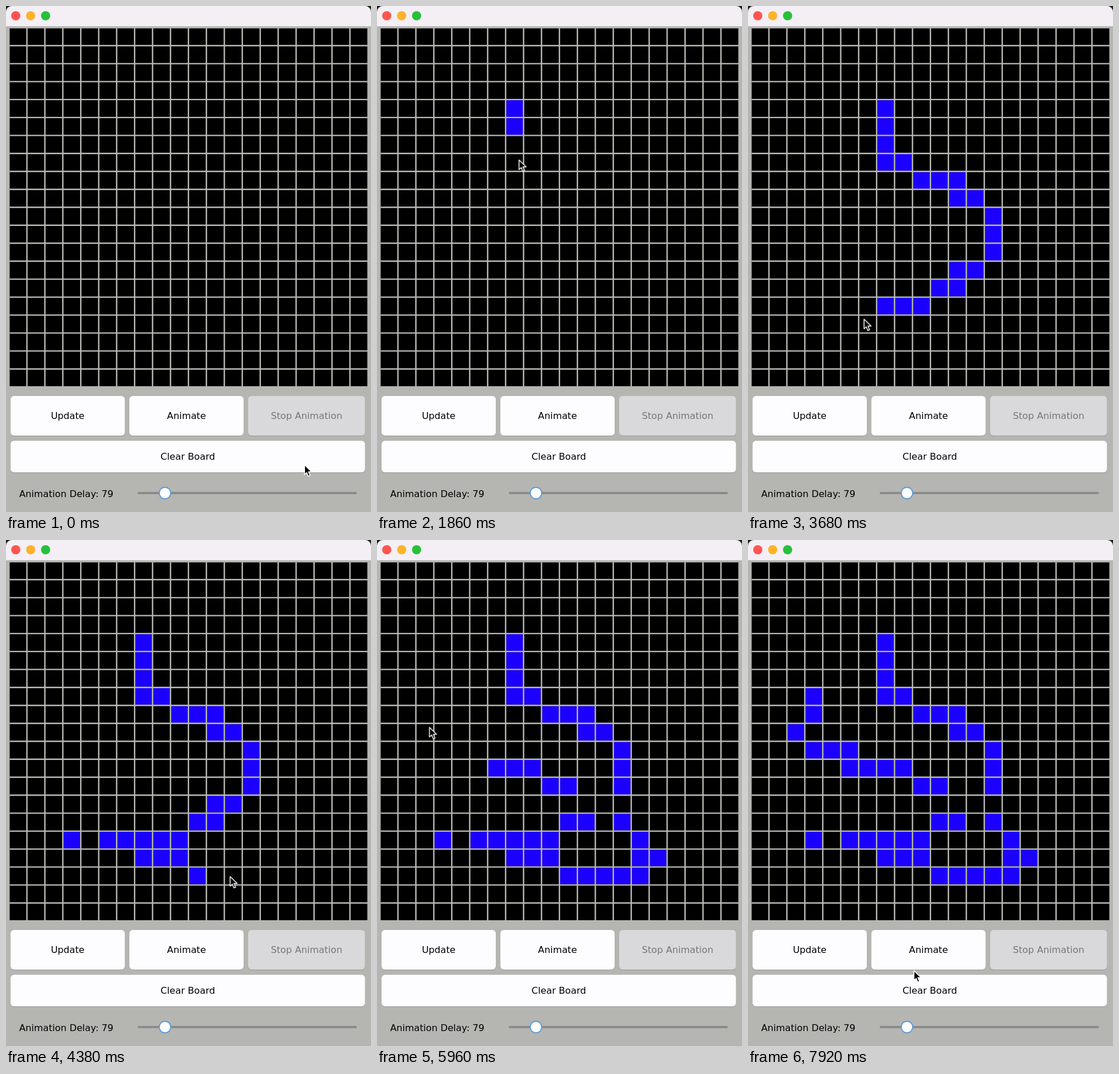
Recreate the animation shown at these times as an HTML page. Size 636x881 px, loop 8 s.

```html
<!DOCTYPE html>
<html lang="en">
<head>
<meta charset="utf-8">
<title>Cell board</title>
<style>
  html, body { margin: 0; width: 100%; height: 100%; overflow: hidden; background: #1c1c1c; }
  svg { display: block; width: 636px; height: 881px; }
  text { font: 16.2px "DejaVu Sans", sans-serif; text-anchor: middle; }
  .button rect { fill: #fdfdff; }
  .button .shadow { fill: #979794; }
  .disabled rect { fill: #d9d9db; }
  .disabled text { fill: #777; }
</style>
</head>
<body>
<svg viewBox="0 0 636 881" xmlns="http://www.w3.org/2000/svg">
  <rect y="36" width="636" height="845" fill="#b5b5b1"/>
  <path d="M0 36V10A10 10 0 0 1 10 0H626A10 10 0 0 1 636 10V36Z" fill="#f3eff5"/>
  <path d="M0 36H636" stroke="#a3a3a0"/>
  <circle cx="17" cy="17" r="8" fill="#fe5550"/>
  <circle cx="43" cy="17" r="8" fill="#fdb32a"/>
  <circle cx="69" cy="17" r="8" fill="#27c03a"/>
  <rect x="6.4" y="39" width="623.2" height="623" fill="#000"/>
  <g id="cells" fill="#1c00ff"></g>
  <path id="grid" stroke="#bbbbb5" stroke-width="2.4"/>
  <g id="buttons"></g>
  <text x="23" y="855" style="text-anchor:start">Animation Delay: 79</text>
  <path d="M231.5 848H609.5" stroke="#8b8b8b" stroke-width="4" stroke-linecap="round"/>
  <circle cx="277" cy="848" r="10" fill="#fff" stroke="#5b9bd8" stroke-width="1.8"/>
  <path id="pointer" d="M1.2 2V18.8L5 15.3L7.8 21.8L10.8 20.5L8 14H13.5Z"
        stroke="#fff" stroke-width="1.5" stroke-linejoin="round"/>
</svg>
<script>
const LOOP = 8000, PITCH = 31.27, LEFT = 6.4, TOP = 39;
const byId = id => document.getElementById(id);

function add(parent, tag, attrs, text = '') {
  const node = document.createElementNS('http://www.w3.org/2000/svg', tag);
  for (const name in attrs) node.setAttribute(name, attrs[name]);
  node.textContent = text;
  return parent.appendChild(node);
}

function button(x, y, width, height, label, state = '') {
  const group = add(byId('buttons'), 'g', { class: `button ${state}` });
  const box = { x, width, height, rx: 6 };
  add(group, 'rect', { ...box, y: y + 1, class: 'shadow' });
  add(group, 'rect', { ...box, y });
  add(group, 'text', { x: x + width / 2, y: y + height / 2 + 5.7 }, label);
}
button(8, 679, 199, 69, 'Update');
button(215, 679, 199, 69, 'Animate');
button(422, 679, 203.5, 69, 'Stop Animation', 'disabled');
button(8, 757, 617.5, 55, 'Clear Board');

let lines = '';
for (let i = 1; i < 20; i++) {
  const offset = i * PITCH - 1.2;
  lines += `M${LEFT + offset} ${TOP}V662M${LEFT} ${TOP + offset}H630`;
}
byId('grid').setAttribute('d', lines);

function play(node, frames) {
  node.animate(frames, { duration: LOOP, iterations: Infinity });
}

// Corners of the drawn strokes, as [column, row].
const strokes = [
  [[7,4], [7,7], [8,7], [9,8], [11,8], [11,9], [12,9], [13,10], [13,12],
   [12,13], [11,13], [11,14], [10,14], [9,15], [5,15]],
  [[3,15]],
  [[7,16], [9,16], [10,17], [14,17], [15,16], [14,16], [14,15], [12,13], [11,13],
   [10,12], [9,12], [8,11], [5,11], [5,10], [3,10], [2,9], [3,8], [3,7]]
];

// Walks one cell at a time from corner to corner.
function walk(corners) {
  let [column, row] = corners[0];
  const cells = [[column, row]];
  for (const [toColumn, toRow] of corners) {
    while (column !== toColumn || row !== toRow) {
      column += Math.sign(toColumn - column);
      row += Math.sign(toRow - row);
      cells.push([column, row]);
    }
  }
  return cells;
}

// The board toggles one cell per tick; a second visit clears it.
const FIRST_TICK = 1720, TICK = 101;
const toggles = {};
strokes.flatMap(walk).forEach((cell, i) => {
  (toggles[cell] ||= []).push(FIRST_TICK + i * TICK);
});

for (const key in toggles) {
  const [column, row] = key.split(',');
  const cell = add(byId('cells'), 'rect', {
    x: LEFT + column * PITCH, y: TOP + row * PITCH, width: 28.9, height: 28.9
  });
  const steps = [0, ...toggles[key]].map((time, i) =>
    ({ opacity: i % 2, offset: time / LOOP, easing: 'step-end' }));
  play(cell, [...steps, { opacity: steps.at(-1).opacity, offset: 1 }]);
}

// Turning points of the pointer: time, x, y.
const turns = [
  [0, 519, 797], [1500, 240, 172], [1860, 246, 266], [2200, 360, 308], [2520, 427, 380],
  [3000, 246, 530], [3350, 112, 524], [4380, 389, 584], [4660, 486, 560],
  [5380, 198, 384], [5850, 84, 335], [6400, 115, 282], [6800, 125, 278],
  [7920, 288, 748], [LOOP, 288, 748]
];
play(byId('pointer'), turns.map(([time, x, y]) =>
  ({ transform: `translate(${x}px, ${y}px)`, offset: time / LOOP })));
</script>
</body>
</html>
```
